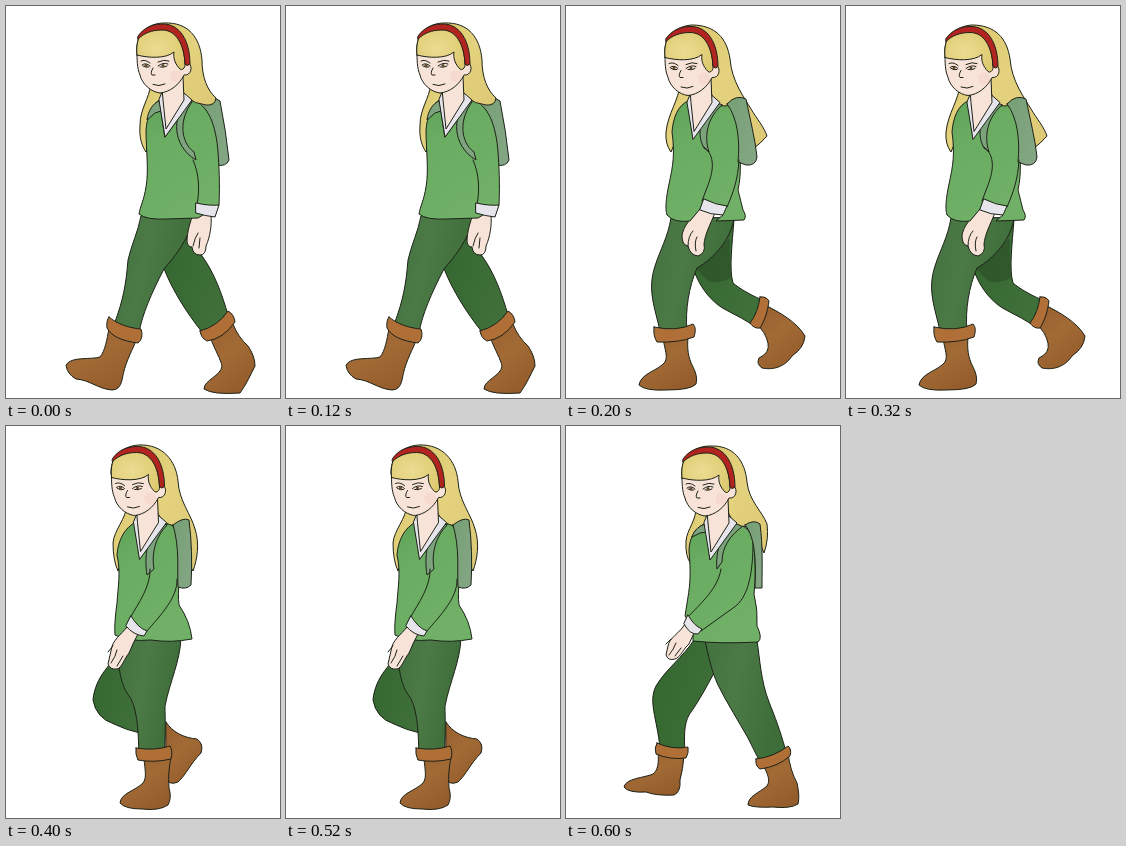
An HTML page that plays this animation: 274 by 392 pixels, repeating every 0.8 s.

```html
<!DOCTYPE html>
<html lang="en">
<head>
<meta charset="utf-8">
<title>Walk cycle</title>
<style>
html, body { margin: 0; width: 100%; height: 100%; overflow: hidden; background: #fff; }
svg { display: block; width: 100vw; height: 100vh; }
path { stroke: #1d2218; stroke-width: 1; stroke-linejoin: round; stroke-linecap: round; }
.hair { fill: url(#hair); }
.knit { fill: url(#knit); }
.near { fill: url(#near); }
.far { fill: url(#far); }
.boot { fill: url(#boot); }
.cuff { fill: #b06f37; }
.skin { fill: #f8e3d9; }
.white { fill: #e6e5eb; }
.pack { fill: url(#pack); }
.line { fill: none; }
.shade { stroke: none; fill: #2d5129; opacity: .7; }
.pose { visibility: hidden; animation: pose .8s step-end infinite; }
.p2 { animation-delay: -.6s; }
.p3 { animation-delay: -.4s; }
.p4 { animation-delay: -.2s; }
@keyframes pose {
  0% { visibility: visible; }
  25%, 100% { visibility: hidden; }
}
</style>
</head>
<body>
<svg viewBox="0 0 274 392" preserveAspectRatio="none">
  <defs>
    <linearGradient id="hair" x1="0" y1="0" x2="1" y2="1">
      <stop offset="0" stop-color="#d9c568"/><stop offset=".5" stop-color="#e4d27f"/><stop offset="1" stop-color="#dcc874"/>
    </linearGradient>
    <radialGradient id="bangs" cx=".42" cy=".5" r=".65">
      <stop offset="0" stop-color="#ecdc92"/><stop offset="1" stop-color="#dcc96e"/>
    </radialGradient>
    <linearGradient id="knit" x1="0" y1="0" x2=".5" y2="1">
      <stop offset="0" stop-color="#5da257"/><stop offset=".35" stop-color="#6aac62"/><stop offset="1" stop-color="#70b067"/>
    </linearGradient>
    <linearGradient id="near" x1="0" y1="0" x2="1" y2=".3">
      <stop offset="0" stop-color="#43713f"/><stop offset=".45" stop-color="#4c7a47"/><stop offset="1" stop-color="#3d6d39"/>
    </linearGradient>
    <linearGradient id="far" x1="0" y1="0" x2="1" y2=".4">
      <stop offset="0" stop-color="#34662f"/><stop offset="1" stop-color="#3f703a"/>
    </linearGradient>
    <linearGradient id="boot" x1="0" y1="0" x2=".6" y2="1">
      <stop offset="0" stop-color="#965f2d"/><stop offset=".5" stop-color="#a26a35"/><stop offset="1" stop-color="#955d2b"/>
    </linearGradient>
    <linearGradient id="pack" x1="0" y1="0" x2="1" y2="1">
      <stop offset="0" stop-color="#76a076"/><stop offset="1" stop-color="#85a685"/>
    </linearGradient>

    <g id="head">
      <path class="white" d="M153 94L159 131L186 94L178 87L156 87Z"/>
      <path class="skin" d="M156 82L157 94L160 123L178 94L177 70Z"/>
      <path class="skin" d="M131 45C131 54 131 62 134 69C136 78 145 86 154 87C164 86 173 79 178 69C185 70 187 61 183 57L176 36L140 33Z"/>
      <circle cx="170" cy="70" r="6" fill="#f5cfc3" opacity=".45"/>
      <path d="M131 49C130 38 132 31 137 25C150 18 168 22 174 34C178 43 179 54 179 60Q177 65 174 63C169 58 167 52 168 46C160 53 142 52 131 49Z" fill="url(#bangs)"/>
      <path d="M132 30C139 20 149 18 157 18C174 18 184 35 184 58Q181 61 179 58C178 38 170 24 156 24C146 24 138 27 132 33Z" fill="#b2241f"/>
      <path class="line" d="M135 55Q139 53 144 57M152 56Q158 53 163 55" stroke="#6b5a35" stroke-width=".7"/>
      <path class="line" d="M136 59Q140 56 144 60M152 60Q157 56 162 58" stroke-width=".9"/>
      <path class="line" d="M137 60Q140 62 143 61M154 61Q158 62 161 60" stroke="#8a7661" stroke-width=".5"/>
      <g fill="#5d4a28"><circle cx="140" cy="59.400" r="1.500"/><circle cx="157" cy="59.400" r="1.500"/></g>
      <path class="line" d="M147 62Q144 67 146 69L149 69" stroke="#a3847a" stroke-width=".6"/>
      <path class="line" d="M147 78.500Q153 81 159 78" stroke="#7d463f" stroke-width=".9"/>
    </g>
  </defs>

  <g class="pose p1">
    <path class="hair" d="M145 78C143 93 134 103 134 119C133 132 136 140 140 146C145 130 151 108 159 90Z"/>
    <path class="pack" d="M186 92Q202 86 214 95Q220 125 223 154Q220 161 211 159L188 148Z"/>
    <path class="far" d="M157 260C165 282 180 306 196 326Q212 321 222 309C216 288 208 266 196 250L183 225Z"/>
    <path class="boot" d="M204 331C209 344 215 354 216 360C215 370 198 374 198 383Q207 389 234 387C240 379 245 368 249 360Q249 350 242 340Q232 331 227 318Z"/>
    <path class="cuff" d="M194 325Q212 320 222 305Q228 308 229 316Q217 333 201 335Q195 332 194 325Z"/>
    <path class="near" d="M135 210C132 226 125 240 122 254C120 279 117 294 109 316L133 327C136 309 145 288 158 263C169 250 182 235 188 211Z"/>
    <path class="boot" d="M103 322C101 334 99 345 94 351C85 354 65 350 60 359Q61 368 70 373C84 374 92 383 106 384Q114 384 116 374C119 357 124 349 130 335Z"/>
    <path class="cuff" d="M103 311C111 318 123 322 135 323Q138 332 132 337C117 335 106 331 101 322Q100 315 103 311Z"/>
    <path class="skin" d="M188 206C184 216 181 226 181 236Q182 241 186 241Q187 249 194 249Q200 249 200 240C204 231 206 219 205 209Z"/>
    <path class="line" d="M187 240Q189 231 192 227M193 242L194 232" stroke-width=".7"/>
    <path class="knit" d="M153 94C146 99 141 111 140 124C140 145 143 164 140 181C138 194 134 201 133 208Q140 214 160 213L192 212L213 199C214 178 213 159 212 146C210 119 202 98 186 94L159 131Z"/>
    <path class="pack" d="M153 95C147 97 142 105 141 114L149 107L155 105Z"/>
    <path class="line" d="M187 154C193 167 194 185 191 198"/>
    <path class="pack" d="M180 97C167 109 165 139 190 154L188 146C174 136 173 113 186 96Z"/>
    <path class="white" d="M190 197Q203 200 213 199L209 211Q199 210 190 207Z"/>
    <path class="hair" d="M131 46C129 28 142 17 158 17C182 16 194 31 196 54C196 71 201 84 210 92Q209 100 200 99Q189 98 180 91L177 86L176 62L155 45Z"/>
    <use href="#head"/>
  </g>

  <g class="pose p2">
    <path class="hair" d="M114 78C113 94 102 107 100 126Q99 138 105 146C112 130 118 108 127 90Z"/>
    <path class="far" d="M127 262C134 283 147 298 162 305Q176 312 187 319Q194 306 194 293C185 289 174 283 167 277C163 263 166 240 168 214Z"/>
    <path class="shade" d="M129 262L164 232Q163 259 165 272Q150 279 142 275Z"/>
    <path class="boot" d="M199 299C213 306 231 316 239 330Q238 342 226 350C218 362 206 364 196 362Q190 358 193 352Q204 347 202 337Q199 325 191 319Z"/>
    <path class="cuff" d="M194 291Q200 290 203 295Q201 311 194 322Q188 323 184 317Q192 307 194 291Z"/>
    <path class="near" d="M105 212C102 231 94 244 89 260C81 284 89 302 94 325L121 324C119 305 123 280 131 262C148 252 165 234 168 212Z"/>
    <path class="boot" d="M97 332C99 345 102 350 99 356C92 365 75 367 73 379Q79 385 100 384Q125 384 130 378Q132 370 127 361C122 351 121 343 122 331Z"/>
    <path class="cuff" d="M88 321Q111 326 127 318Q131 322 128 331Q112 337 91 336Q87 330 88 321Z"/>
    <path class="skin" d="M134 202C126 211 117 220 116 230Q116 239 122 240Q124 249 132 250Q140 247 138 238C139 228 144 219 149 207Z"/>
    <path class="knit" d="M122 95C112 99 107 112 106 126C109 148 107 160 103 178C100 192 99 203 101 209Q108 217 124 215L134 203L157 209L150 215L178 214Q181 210 177 204L172 184C176 166 174 150 173 133C174 111 166 97 152 95L127 131Z"/>
    <path class="hair" d="M99 48C97 31 110 20 126 19C149 19 161 32 164 53C166 76 178 91 185 103C191 113 198 121 201 130Q194 138 188 142C179 132 177 106 166 98Q154 104 147 93L145 86L144 65L123 47Z"/>
    <path class="pack" d="M161 98Q170 88 180 93C184 113 189 132 191 151Q190 160 180 159L172 156C174 136 172 112 161 98Z"/>
    <path class="pack" d="M150 97C136 106 129 126 138 142L143 146C137 128 143 110 156 99Z"/>
    <path class="line" d="M138 141C150 150 147 166 142 179L136 195M173 154C172 174 167 187 161 201"/>
    <path class="line" d="M122 240Q122 230 127 225M130 245Q128 236 131 231" stroke-width=".7"/>
    <path class="white" d="M138 193Q150 199 161 200L157 209Q145 209 134 204Z"/>
    <use href="#head" x="-32" y="2.500"/>
  </g>

  <g class="pose p3">
    <path class="hair" d="M121 79C120 93 108 104 107 117Q107 134 112 145C118 129 125 108 135 90Z"/>
    <path class="boot" d="M160 296C166 306 178 312 191 313Q198 318 195 327C184 338 180 349 172 356Q163 360 160 352Z"/>
    <path class="far" d="M118 225C106 235 89 251 87 274Q90 292 108 298Q120 304 134 307L137 255Z"/>
    <path class="near" d="M117 212C110 234 113 253 121 267C132 280 132 304 133 328L158 327C160 307 159 292 159 280C164 255 174 236 175 212Z"/>
    <path class="boot" d="M138 333C139 344 141 352 137 357C129 365 115 367 114 377Q119 383 136 383Q153 385 162 379Q166 372 163 362C162 350 163 342 165 331Z"/>
    <path class="cuff" d="M130 322Q149 325 164 320Q167 325 165 333Q148 337 132 334Q129 328 130 322Z"/>
    <path class="knit" d="M130 96C119 101 112 114 111 129C115 147 112 160 111 177Q108 198 109 209Q122 216 145 214Q165 217 186 213Q184 195 173 179C171 164 175 147 174 131C175 109 170 98 158 96L134 132Z"/>
    <path class="hair" d="M105 48C104 31 116 20 133 19C157 18 170 35 172 55C173 75 185 88 189 103C194 118 191 134 187 145C178 133 182 109 169 100Q158 98 154 91L151 86L150 65L130 47Z"/>
    <path class="pack" d="M167 99Q177 91 183 94Q187 125 185 159Q180 164 172 161C171 145 174 122 167 99Z"/>
    <path class="pack" d="M154 98C141 109 138 130 141 149L148 143C145 127 150 110 161 99Z"/>
    <path class="line" d="M144 143C145 160 132 178 124 192M171 153C172 171 155 189 140 206"/>
    <path class="skin" d="M121 201C115 209 106 214 105 225L102 238Q104 244 111 243C116 242 118 233 123 227Q127 217 132 208Z"/>
    <path class="line" d="M105 237Q110 230 111 224M111 240L117 230M107 220L102 226" stroke-width=".7"/>
    <path class="white" d="M125 190Q132 202 141 205L138 210Q127 209 120 200Z"/>
    <use href="#head" x="-25.500" y="2.500"/>
  </g>

  <g class="pose p4">
    <path class="hair" d="M130 80C131 94 121 103 120 115Q119 130 125 138C130 125 136 106 145 90Z"/>
    <path class="far" d="M128 214C117 231 100 243 90 260C82 276 91 292 94 322L119 326C118 311 118 298 123 289C133 275 141 260 148 247L161 214Z"/>
    <path class="boot" d="M92 327C93 337 92 344 87 348C78 352 60 352 58 361Q62 367 80 366Q91 370 108 369Q115 366 114 354Q117 344 118 329Z"/>
    <path class="cuff" d="M91 317Q106 324 122 321Q123 327 120 332Q104 334 90 328Q88 322 91 317Z"/>
    <path class="near" d="M139 214C142 228 145 244 152 259C161 277 173 296 182 312L194 336Q209 332 219 322C214 304 209 291 203 276C195 255 194 235 191 214Z"/>
    <path class="boot" d="M197 339C201 347 205 354 201 360C193 367 182 370 182 379Q189 382 207 381Q224 383 232 378Q234 370 231 357Q224 344 222 327Z"/>
    <path class="cuff" d="M190 333Q208 331 222 320Q226 323 224 330Q211 341 194 343Q189 340 190 333Z"/>
    <path class="knit" d="M140 97C130 101 123 111 123 125C125 147 124 159 122 171L119 190L127 201L127 215Q155 218 192 216Q197 212 191 200Q192 184 188 168C190 150 189 132 188 120C187 106 179 98 167 97L144 133Z"/>
    <path class="pack" d="M140 98C134 99 128 104 126 111L134 107L141 106Z"/>
    <path class="line" d="M155 143C152 163 134 178 121 192M187 116C187 145 183 172 167 182L135 205"/>
    <path class="pack" d="M169 98C156 106 149 125 151 143L156 136C156 122 163 110 177 100Z"/>
    <path class="hair" d="M116 49C114 32 127 20 144 20C168 19 179 35 181 56C183 75 196 85 201 98Q203 113 198 127C193 117 194 104 181 101Q169 100 165 92L162 86L161 65L141 48Z"/>
    <path class="pack" d="M179 99Q188 93 194 98C197 120 196 142 196 162L189 162C190 140 190 111 179 99Z"/>
    <path class="skin" d="M119 198C114 207 103 212 102 220L100 229Q102 235 109 233C115 231 117 223 123 218L128 207Z"/>
    <path class="line" d="M103 229Q108 223 110 217M109 230L115 222M105 213L100 218" stroke-width=".7"/>
    <path class="white" d="M122 189Q128 200 136 203L132 208Q124 209 118 198Z"/>
    <use href="#head" x="-15" y="3"/>
  </g>
</svg>
</body>
</html>
```
